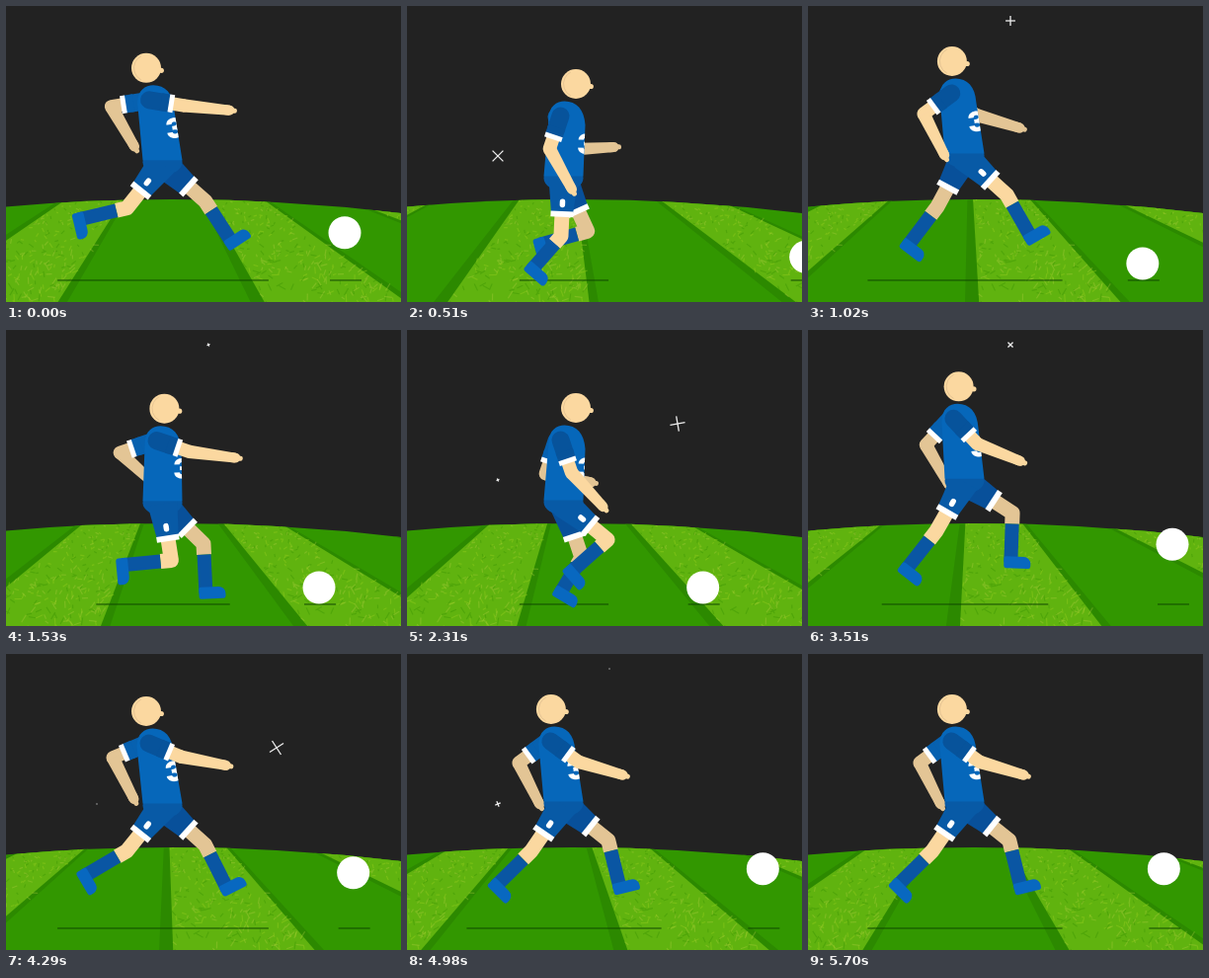
Animation of 400 by 300 pixels, one loop 5.73 s. Source, as an HTML page with a canvas:

```html
<!DOCTYPE html>
<html lang="en">
<head>
<meta charset="utf-8">
<title>Running footballer</title>
<style>
html, body { margin: 0; width: 100%; height: 100%; overflow: hidden; background: #222; }
canvas { display: block; width: 100vw; height: 100vh; }
</style>
</head>
<body>
<canvas id="stage" width="400" height="300"></canvas>
<script>
const ctx = document.getElementById('stage').getContext('2d');
const LOOP = 5730, STEP = 30, STRIDE = 720;
const TAU = Math.PI * 2, RAD = Math.PI / 180;

const color = {
  shirt: '#0667ba', nearShorts: '#085aa6', farShorts: '#08509a', sock: '#0a56a3', boot: '#0868c0',
  nearSleeve: '#07539b', farSleeve: '#0761b0',
  nearSkin: '#fbd8a0', farSkin: '#e3c595', white: '#fff'
};

const mod = (a, n) => (a % n + n) % n;
const add = (p, x, y) => ({ x: p.x + x, y: p.y + y });
const mix = (a, b, f) => ({ x: a.x + (b.x - a.x) * f, y: a.y + (b.y - a.y) * f });
// Point at a distance and an angle from straight down, forward positive.
const swing = (p, deg, d) => add(p, Math.sin(deg * RAD) * d, Math.cos(deg * RAD) * d);
function unit(a, b) {
  const d = Math.hypot(b.x - a.x, b.y - a.y) || 1;
  return { x: (b.x - a.x) / d, y: (b.y - a.y) / d };
}

// Sum of harmonics, each given as [cosine, sine].
const series = (angle, mean, ...parts) => parts.reduce((sum, [a, b], i) =>
  sum + a * Math.cos((i + 1) * angle) + b * Math.sin((i + 1) * angle), mean);

// Two bounces in each stride.
const bounce = (t, lag) => Math.cos(2 * TAU * (t - lag) / STRIDE);

function legPose(waist, t) {
  const a = TAU * t / STRIDE;
  const thigh = series(a, 14.5, [47.5, -13.4], [-9.2, -1.8], [-4.5, 8]);
  const shin = series(a, -30, [45, 16], [17, -12.8], [-1.4, 5.5], [2.4, 0]);
  const hip = add(waist, 0, 3), knee = swing(hip, thigh, 58);
  const ankle = swing(knee, shin, 50);
  ankle.y = Math.min(ankle.y, 267);
  return { hip, knee, ankle };
}

function armPose(shoulder, t, lift) {
  const a = TAU * t / STRIDE;
  const upper = series(a, 0, [81, 7], [0, 0], [0, 13]);
  const fore = series(a, 57, [27, 0], [0, 8]) + lift;
  const elbow = swing(shoulder, upper, 35);
  return { shoulder, elbow, hand: swing(elbow, fore, 47) };
}

function playerPose(t) {
  const lean = bounce(t, 165), lift = 27 * Math.max(0, lean) ** 2;
  const waist = { x: 158.5, y: 162 + 12.5 * bounce(t, 117) };
  const shoulder = { x: 154 + 5.5 * bounce(t, 152), y: waist.y - 60 };
  return {
    lean, waist, shoulder,
    head: { x: 156.5 + 15 * lean, y: waist.y - 93.5 },
    nearLeg: legPose(waist, t + 400),
    farLeg: legPose(waist, t),
    nearArm: armPose(add(shoulder, -4, -1), t, -lift),
    farArm: armPose(add(shoulder, -8, 0), t + STRIDE / 2, lift)
  };
}

// Kicked ahead, then it hops once and is caught up with.
function ballPose(t) {
  const u = mod(t - 225, STRIDE) / STRIDE, turn = 0.35;
  const x = u < turn ? 278 + 135 * Math.sin(u / turn * Math.PI / 2) : 278 + 208 * (1 - u);
  const hop = Math.max(0, 1 - ((u - 0.58) / 0.2) ** 2);
  return { x, y: 261 - 44 * hop };
}

// Drawing helpers
function line(points, width, stroke, cap = 'butt') {
  ctx.beginPath();
  points.forEach(p => ctx.lineTo(p.x, p.y));
  ctx.lineWidth = width;
  ctx.strokeStyle = stroke;
  ctx.lineCap = cap;
  ctx.lineJoin = 'round';
  ctx.stroke();
}

function polygon(points, fill) {
  ctx.beginPath();
  points.forEach(p => ctx.lineTo(p.x, p.y));
  ctx.closePath();
  ctx.fillStyle = fill;
  ctx.fill();
}

function oval(p, rx, ry, fill) {
  ctx.beginPath();
  ctx.ellipse(p.x, p.y, rx, ry, 0, 0, TAU);
  ctx.fillStyle = fill;
  ctx.fill();
}
const disc = (p, r, fill) => oval(p, r, r, fill);

// Bar that narrows from half width ra to rb.
function taper(a, b, ra, rb, fill) {
  const u = unit(a, b);
  const side = (p, r) => add(p, u.y * r, -u.x * r);
  polygon([side(a, ra), side(b, rb), side(b, -rb), side(a, -ra)], fill);
}

// Field
let seed = 7;
const random = () => (seed = (seed * 16807) % 2147483647) / 2147483647;
const LIGHT = 61, PAIR = 150;
const blades = Array.from({ length: 260 }, () => ({
  u: random() * LIGHT, y: 197 + 103 * random(), angle: random() * Math.PI,
  size: 3 + random() * 4, tone: Math.floor(random() * 3)
}));
const bladeColors = ['rgba(150,205,30,.4)', 'rgba(55,145,0,.4)', 'rgba(185,210,70,.3)'];
const ground = (u, y) => ({ x: 163 + (u - 163) * (1 + 1.35 * (y - 200) / 100), y });

function strip(from, to, fill) {
  polygon([ground(from, 185), ground(to, 185), ground(to, 300), ground(from, 300)], fill);
}

function drawField(t) {
  ctx.save();
  ctx.beginPath();
  ctx.moveTo(0, 203.4);
  ctx.quadraticCurveTo(200, 186, 400, 210);
  ctx.lineTo(400, 300);
  ctx.lineTo(0, 300);
  ctx.clip();
  ctx.fillStyle = '#329700';
  ctx.fillRect(0, 180, 400, 120);
  const first = mod(55 - t * 0.184, PAIR) - PAIR;
  const lights = [0, 1, 2, 3].map(k => first + k * PAIR);
  for (const u of lights) {
    strip(u - 6, u + LIGHT + 4, '#2c8900');
    strip(u, u + LIGHT, '#60b30f');
  }
  bladeColors.forEach((tint, tone) => {
    ctx.beginPath();
    for (const u of lights) for (const b of blades) {
      if (b.tone !== tone) continue;
      const p = ground(u + b.u, b.y), q = swing(p, b.angle / RAD, b.size * (0.5 + (b.y - 197) / 130));
      ctx.moveTo(p.x, p.y);
      ctx.lineTo(q.x, q.y);
    }
    ctx.lineWidth = 1.2;
    ctx.strokeStyle = tint;
    ctx.stroke();
  });
  ctx.restore();
}

function shadow(x, half) {
  line([{ x: x - half, y: 278 }, { x: x + half, y: 278 }], 1.5, 'rgba(15,70,0,.65)');
}

// Stars
const stars = [
  { x: 92, y: 152, peak: 570, first: 0, turn: 90 },
  { x: 205, y: 15, peak: 1200, first: 0, turn: 45 },
  { x: 274, y: 95, peak: 2250, first: 700, turn: 55 }
];
const STAR_CYCLE = 2070;

function drawStar(star, t) {
  if (t < star.first) return;
  const half = STAR_CYCLE / 2;
  const dt = mod(t - star.peak + half, STAR_CYCLE) - half;
  const r = 9 * (1 - Math.abs(dt) / 400);
  if (r < 1) {
    if (dt > -550 && dt < 0) disc(star, 0.9, '#777');
    return;
  }
  const angle = star.turn + dt * 0.75;
  for (const k of [angle, angle + 90]) line([swing(star, k, r), swing(star, k, -r)], 1.3, '#eee');
}

// Player
function drawLeg({ hip, knee, ankle }, skin, cloth, badge) {
  const hem = mix(hip, knee, 0.6), u = unit(hip, knee);
  const sockTop = mix(knee, ankle, 0.22), shin = unit(knee, ankle);

  line([hem, knee, sockTop], 15, skin);
  line([sockTop, ankle], 14, color.sock);
  ctx.save();
  ctx.translate(ankle.x, ankle.y);
  ctx.rotate(Math.atan2(-shin.x, shin.y));
  ctx.beginPath();
  ctx.roundRect(-7, -6, 27, 12, [2, 7, 3, 3]);
  ctx.fillStyle = color.boot;
  ctx.fill();
  ctx.restore();

  taper(hip, hem, 15, 11, cloth);
  taper(mix(hip, knee, 0.56), mix(hip, knee, 0.66), 11.5, 11.5, color.white);
  if (badge) {
    const c = mix(hip, knee, 0.42);
    line([add(c, -u.x * 1.6, -u.y * 1.6), add(c, u.x * 1.6, u.y * 1.6)], 5.5, color.white, 'round');
  }
}

function drawArm({ shoulder, elbow, hand }, skin, sleeve) {
  const u = unit(shoulder, elbow), v = unit(elbow, hand);
  const along = d => add(shoulder, u.x * d, u.y * d);
  line([along(18), elbow], 13.5, skin, 'round');
  taper(elbow, hand, 6.7, 5, skin);
  line([add(hand, -v.x * 4, -v.y * 4), hand], 10, skin, 'round');
  line([hand, add(hand, v.x * 5, v.y * 5)], 5, skin, 'round');
  line([shoulder, along(14)], 18, sleeve, 'round');
  line([along(12), along(21)], 18, sleeve);
  line([along(20), along(25)], 18, color.white);
}

function drawTorso(s, w) {
  ctx.save();
  ctx.beginPath();
  ctx.moveTo(w.x - 20, w.y);
  ctx.lineTo(s.x - 16, s.y + 2);
  ctx.bezierCurveTo(s.x - 16, s.y - 11, s.x - 8, s.y - 16, s.x, s.y - 16);
  ctx.bezierCurveTo(s.x + 12, s.y - 16, s.x + 20, s.y - 8, s.x + 21, s.y + 8);
  ctx.lineTo(w.x + 20, w.y);
  ctx.closePath();
  ctx.fillStyle = color.shirt;
  ctx.fill();
  ctx.clip();
  ctx.translate(s.x + 22, s.y + 29);
  ctx.rotate(Math.atan2(s.x - w.x, w.y - s.y));
  ctx.font = '900 28px Inter, Arial, sans-serif';
  ctx.textAlign = 'center';
  ctx.textBaseline = 'middle';
  ctx.fillStyle = color.white;
  ctx.fillText('3', 0, 0);
  ctx.restore();
}

function drawHead(p) {
  disc(add(p, 15.3, 2.5), 2.6, color.nearSkin);
  disc(p, 15, color.nearSkin);
  ctx.beginPath();
  ctx.arc(p.x + 1, p.y, 13.5, Math.PI * 0.65, Math.PI * 1.35);
  ctx.lineWidth = 1;
  ctx.strokeStyle = '#e6c493';
  ctx.stroke();
}

function drawPlayer(p) {
  drawArm(p.farArm, color.farSkin, color.farSleeve);
  drawLeg(p.farLeg, color.farSkin, color.farShorts, false);
  oval(add(p.waist, 0, 2), 20, 13, color.nearShorts);
  drawLeg(p.nearLeg, color.nearSkin, color.nearShorts, true);
  drawTorso(p.shoulder, p.waist);
  drawArm(p.nearArm, color.nearSkin, color.nearSleeve);
  drawHead(p.head);
}

function draw(now) {
  const t = Math.floor(now % LOOP / STEP) * STEP;
  const player = playerPose(t % STRIDE), ball = ballPose(t);
  ctx.fillStyle = '#222';
  ctx.fillRect(0, 0, 400, 300);
  stars.forEach(star => drawStar(star, t));
  drawField(t);
  shadow(159, 76 - 32 * player.lean);
  shadow(ball.x + 1, 16);
  drawPlayer(player);
  disc(ball, 16.5, color.white);
}

const begin = performance.now();
function frame() {
  draw(performance.now() - begin);
  requestAnimationFrame(frame);
}
frame();
</script>
</body>
</html>
```
